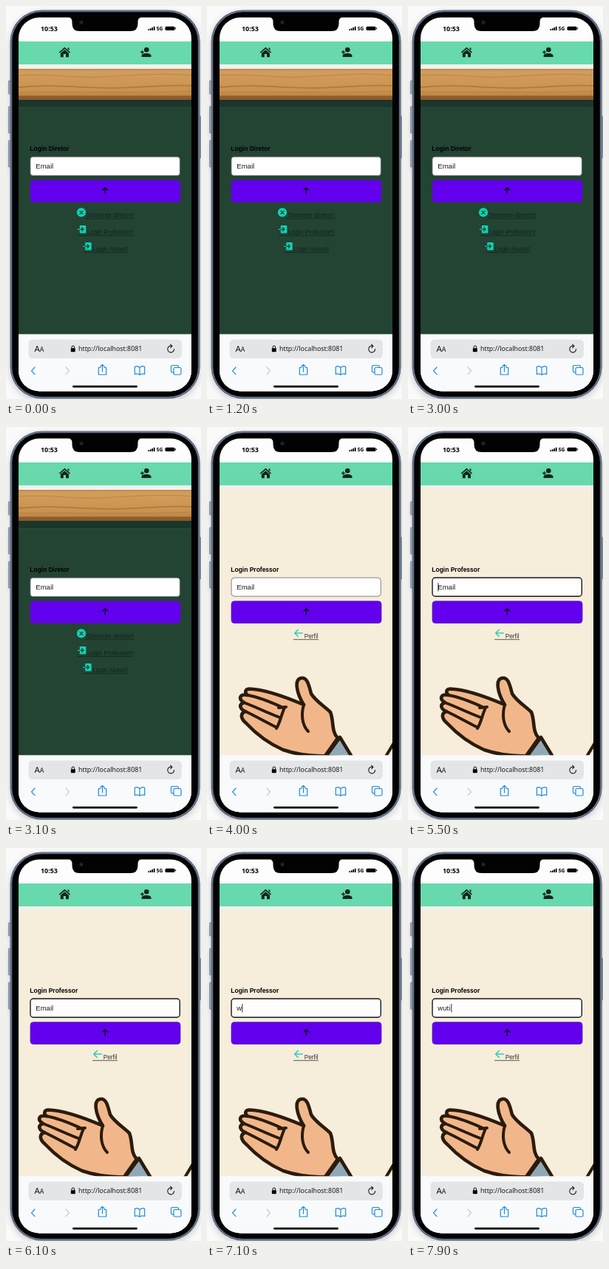
These frames come from a looping animation (264x532 px, 8 s). An HTML page:

```html
<!DOCTYPE html>
<html lang="pt">
<head>
<meta charset="utf-8">
<title>Login</title>
<style>
html, body { margin: 0; width: 100%; height: 100%; overflow: hidden; background: #fafafa; }
svg { display: block; width: 100vw; height: 100vh; }
text { font-family: "Liberation Sans", Arial, sans-serif; white-space: pre; }
.ui { font-family: "Noto Sans", "Open Sans", sans-serif; }
.label { font-size: 8.48px; font-weight: 700; }
.link { font-size: 8.3px; }
.field { font-size: 9.55px; }
.line { fill: none; stroke-linecap: round; stroke-linejoin: round; }
.body { filter: drop-shadow(0 3px 5px #0003); }

.director, .teacher, .hint, .focus, .key, .caret { animation: 8s step-end infinite; }
.director { animation-name: director; }
.teacher { animation-name: teacher; }
.focus { animation-name: focus; }
.hint { animation-name: hint; }
.key1 { animation-name: key1; }
.key2 { animation-name: key2; }
.key3 { animation-name: key3; }
.key4 { animation-name: key4; }
.caret { animation-name: caret; }
@keyframes director { 0% { visibility: visible } 50%, 100% { visibility: hidden } }
@keyframes teacher { 0% { visibility: hidden } 50%, 100% { visibility: visible } }
@keyframes focus { 0% { stroke: #79747e; stroke-width: .9px } 68.75%, 100% { stroke: #17171a; stroke-width: 1.4px } }
@keyframes hint { 0% { visibility: visible } 88.75%, 100% { visibility: hidden } }
@keyframes key1 { 0% { visibility: hidden } 88.75%, 100% { visibility: visible } }
@keyframes key2 { 0% { visibility: hidden } 90%, 100% { visibility: visible } }
@keyframes key3 { 0% { visibility: hidden } 96.25%, 100% { visibility: visible } }
@keyframes key4 { 0% { visibility: hidden } 98.75%, 100% { visibility: visible } }
@keyframes caret {
  0% { visibility: hidden; transform: none }
  68.75% { visibility: visible }
  75% { visibility: hidden }
  82.5% { visibility: visible; transform: none }
  88.75% { visibility: visible; transform: translateX(7px) }
  90% { visibility: visible; transform: translateX(12.8px) }
  96.25% { visibility: visible; transform: translateX(15.6px) }
  98.75%, 100% { visibility: visible; transform: translateX(18px) }
}
</style>
</head>
<body>
<svg viewBox="0 0 264 532" preserveAspectRatio="none">
<defs>
  <clipPath id="screen"><rect x="17" y="15.5" width="234" height="506" rx="28"/></clipPath>
  <clipPath id="page"><rect x="17" y="79" width="234" height="365.5"/></clipPath>
  <linearGradient id="wood" x2="0" y2="1">
    <stop offset="0" stop-color="#c08a4c"/><stop offset=".1" stop-color="#d29e5d"/>
    <stop offset=".8" stop-color="#c9924f"/><stop offset="1" stop-color="#bd8546"/>
  </linearGradient>
  <g id="enter">
    <rect x="3" width="8.5" height="10.5" rx="1.2" fill="#10d2b4"/>
    <path class="line" d="M0 5.3H8M5.8 3L8.2 5.3L5.8 7.6" stroke="#17392d" stroke-width="1.2"/>
    <path d="M0 5.3H3" stroke="#10d2b4" stroke-width="1.3"/>
  </g>
  <g id="button">
    <rect x="33" y="235.8" width="203" height="29.7" rx="4" fill="#6200ee" stroke="#4c1ba6" stroke-width=".8"/>
    <path class="line" d="M134.3 254V246M130.8 249.2L134.3 245.7L137.8 249.2" stroke="#0c0418" stroke-width="1.3"/>
  </g>
</defs>

<!-- phone body -->
<g class="body">
  <g fill="#9aa6b5" stroke="#5c697b" stroke-width=".6">
    <rect x="3.4" y="101" width="4" height="18" rx="1"/>
    <rect x="3.4" y="136" width="4" height="36" rx="1"/>
    <rect x="3.4" y="182" width="4" height="36" rx="1"/>
    <rect x="260" y="149" width="3.6" height="57" rx="1"/>
  </g>
  <rect x="5.6" y="5.5" width="257" height="526" rx="43" fill="#48556a"/>
</g>
<rect x="7" y="6.9" width="254.2" height="523.2" rx="41.6" fill="none" stroke="#8b99ab" stroke-width=".8"/>
<rect x="8.4" y="8.2" width="251.4" height="520.6" rx="40" fill="#020203"/>

<g clip-path="url(#screen)">
  <rect x="17" y="15" width="234" height="508" fill="#fdfdfd"/>
  <rect x="17" y="48" width="234" height="31" fill="#67d9ad"/>
  <rect x="17" y="79" width="234" height="6" fill="#f1f2ef"/>

  <g clip-path="url(#page)">
    <g class="director">
      <rect x="17" y="85" width="235" height="37" fill="url(#wood)"/>
      <g class="line" stroke="#b47a3d" stroke-width="1.3">
        <path d="M17 94C65 91 88 98 130 96S205 90 252 94" stroke-width=".7"/>
        <path d="M17 110C70 105 105 112 150 111S220 106 252 108" stroke-width="1.8"/>
        <path d="M17 117C85 115 165 119 252 115" stroke-width=".7"/>
      </g>
      <rect x="17" y="121.5" width="235" height="5.5" fill="#8e5c2d"/>
      <rect x="17" y="127" width="235" height="318" fill="#234333"/>
      <rect x="17" y="127" width="235" height="10" fill="#1b362a"/>
      <path d="M17 137.3H252M17 443.7H252" stroke="#315140" stroke-width=".7"/>
      <text class="label" x="32.3" y="195.5">Login Diretor</text>
      <rect x="33" y="204.2" width="202.3" height="25.2" rx="3.5" fill="#fefefe" stroke="#79747e" stroke-width=".8"/>
      <use href="#button"/>
      <circle cx="102" cy="279.4" r="6.1" fill="#10d2b4"/>
      <path class="line" d="M99.9 277.3L104.1 281.5M104.1 277.3L99.9 281.5" stroke="#17392d" stroke-width="1.1"/>
      <use href="#enter" x="96.8" y="297"/>
      <use href="#enter" x="104.2" y="320"/>
      <g class="link" fill="#10231b">
        <text x="109.3" y="286.3">Somente diretor!!</text>
        <text x="110" y="309.3">Login Professor!!</text>
        <text x="117.2" y="332.2">Login Aluno!!</text>
      </g>
      <path d="M107 287.7H173.2M97 310.7H172.8M104.5 333.6H165.7" stroke="#10231b" stroke-width=".7"/>
    </g>

    <g class="teacher">
      <rect x="17" y="83.5" width="235" height="362" fill="#f6eddb"/>
      <g class="line" stroke="#2b1c0e" stroke-width="4.6">
        <path d="M161 446L180 420L197 448Z" fill="#91a9b6"/>
        <path d="M131 376C110 367 80 355 57 354.5C51 355 51 360 55 363C44 361 42 368 50 373C42 376 45 382 52 385C44 388 46 395 53 401C66 415 85 429 103 437C118 442 139 446 160 445L177 421C168 412 172 398 167 386C159 378 147 371 141 361C138 350 136 338 127 340C118 342 121 360 131 376Z" fill="#f1b78b"/>
        <path d="M55 363C72 366 88 373 103 380M50 373C66 379 82 387 98 393M52 385C65 391 79 399 93 406M97 380L107 379M105 380C100 391 99 400 94 408M131 376C127 390 129 404 137 412" stroke-width="4"/>
        <path d="M242 446L254 426" stroke-width="4"/>
      </g>
      <text class="label" x="32.3" y="195.5">Login Professor</text>
      <rect class="focus" x="33" y="204" width="202.3" height="25.2" rx="4" fill="#fefefd"/>
      <use href="#button"/>
      <path class="line" d="M129.2 279H119.2M123.2 274.5L118.8 279L123.2 283.5" stroke="#35cdb8" stroke-width="1.7"/>
      <text class="link" x="131.7" y="286.2" fill="#35332f">Perfil</text>
      <path d="M117 287.7H151" stroke="#35332f" stroke-width=".8"/>
    </g>
  </g>

  <!-- field content -->
  <g class="field" fill="#1c1b1f">
    <text class="hint" x="40.3" y="219.5">Email</text>
    <text x="40.3" y="219.5"><tspan class="key key1">w</tspan><tspan class="key key2">u</tspan><tspan class="key key3">t</tspan><tspan class="key key4">i</tspan></text>
    <rect class="caret" x="40.4" y="211" width=".9" height="11.5"/>
  </g>

  <!-- browser bar -->
  <rect x="17" y="444.5" width="234" height="78" fill="#f8fafb"/>
  <rect x="30.5" y="451.5" width="207.5" height="25.5" rx="5.5" fill="#e3e5e7"/>
  <g fill="#17191c">
    <text class="ui" x="38.5" y="468" font-size="11.5">A<tspan font-size="8.7">A</tspan></text>
    <text class="ui" x="98" y="467.3" font-size="8.87">http://localhost:8081</text>
  </g>
  <rect x="87.8" y="463.2" width="6" height="5" rx=".8"/>
  <path class="line" d="M89 463V461.8A1.8 1.8 0 0 1 92.6 461.8V463" stroke="#000" stroke-width="1"/>
  <path class="line" d="M224.8 460.4A4.4 4.4 0 1 0 227.6 464.6M222.6 458.2L225 460.4L222.8 462.6" stroke="#17191c" stroke-width="1.1"/>
  <g class="line" stroke="#1f8ae0" stroke-width="1.2">
    <path d="M39 489L34.5 493.8L39 498.6"/>
    <path d="M81 489L85.5 493.8L81 498.6" stroke="#c4c8cc"/>
    <path d="M128 489.5H125.3V499H135.7V489.5H133M130.5 495V485.3M127.8 488L130.5 485.3L133.2 488"/>
    <path d="M181 489.5Q177.5 486.5 174.3 488.5V498.5Q178 497 181 499.3Q184 497 187.7 498.5V488.5Q184.5 486.5 181 489.5V499.3"/>
    <rect x="227" y="489.5" width="10" height="9.5" rx="1.5"/>
    <path d="M226.5 495.8H225A1.5 1.5 0 0 1 223.5 494.3V488A1.5 1.5 0 0 1 225 486.5H231.8A1.5 1.5 0 0 1 233.3 488V489"/>
  </g>
  <rect x="90" y="513.7" width="88" height="2.8" rx="1.4"/>

  <!-- status bar and header -->
  <text class="ui" x="47" y="33.8" font-size="8.9" font-weight="700">10:53</text>
  <path d="M193.2 33V31.2M195.7 33V30.2M198.2 33V29M200.7 33V27.8" stroke="#000" stroke-width="1.7"/>
  <text class="ui" x="203.7" y="33.2" font-size="6.6" font-weight="700">5G</text>
  <rect x="215.5" y="27.7" width="13" height="5.2" rx="1.5"/>
  <rect x="229" y="29.3" width="1.1" height="2" rx=".5"/>
  <g fill="#17251f">
    <path d="M79.4 55.7L87 62.6L86 63.8L79.4 58L72.8 63.8L71.8 62.6ZM83.5 56.5H85.4V60.2L83.5 58.5Z"/>
    <path d="M79.4 59.2L85 64.1V69.3H81V65H77.8V69.3H73.8V64.1Z"/>
    <circle cx="190.3" cy="59.3" r="3.3"/>
    <path d="M183.6 69V67.3C183.6 62.8 196.5 62.8 196.5 67.3V69Z"/>
    <path d="M184.5 60V65M182 62.5H187" stroke="#17251f" stroke-width="1.3"/>
  </g>
</g>

<!-- notch -->
<path d="M84 14.5H184Q178.5 16 178.5 21V24Q178.5 34 168.5 34H99.5Q89.5 34 89.5 24V21Q89.5 16 84 14.5Z" fill="#020203"/>
<circle cx="102" cy="22.3" r="3" fill="#10151f"/>
<circle cx="102" cy="22.3" r="1.2" fill="#25344f"/>
</svg>
</body>
</html>
```
